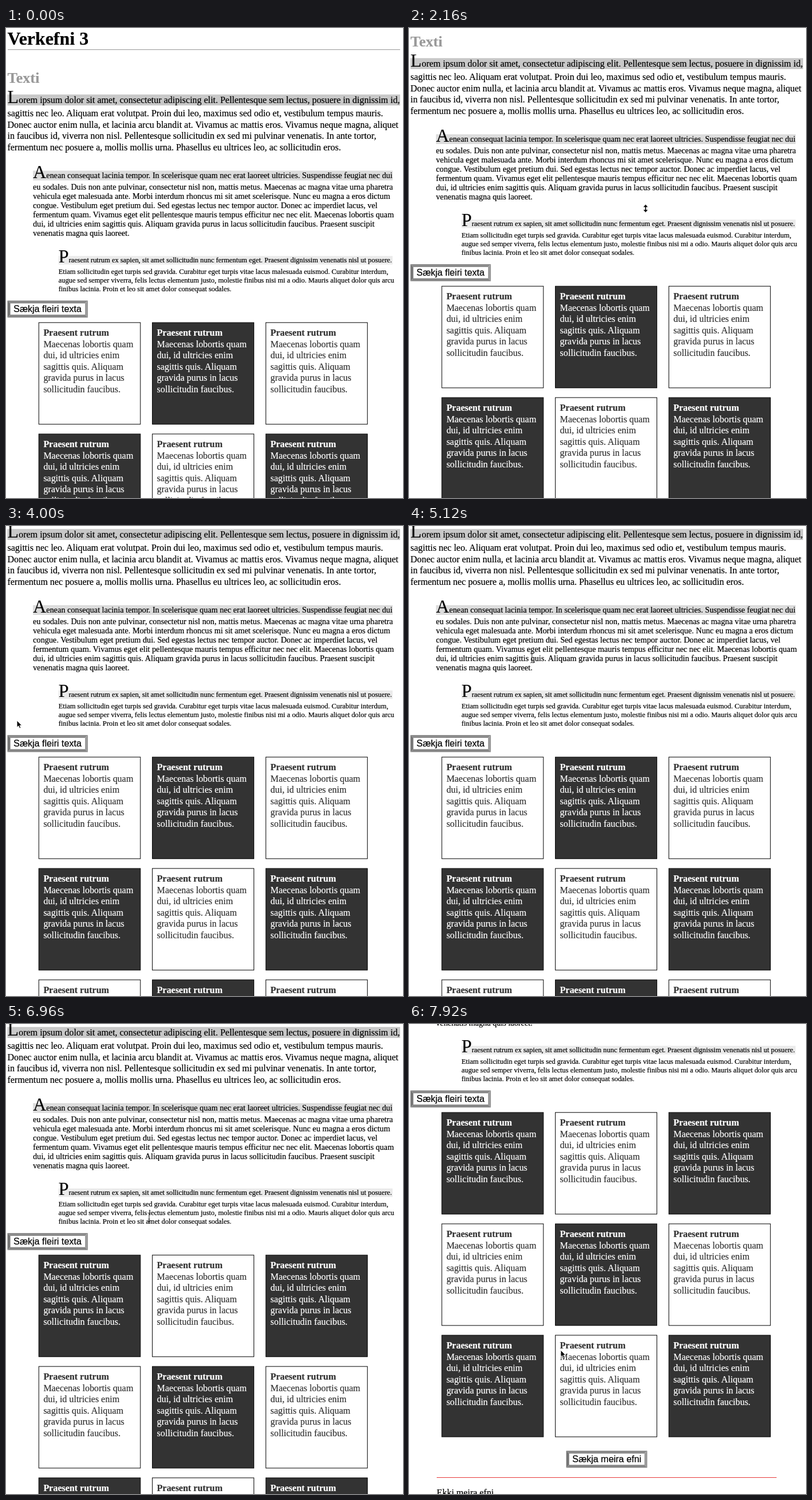
An HTML page that plays this animation: 688 by 814 pixels, repeating every 8000 ms.

```html
<!DOCTYPE html>
<html lang="is">
<head>
<meta charset="utf-8">
<title>Verkefni 3</title>
<style>
  html, body { margin: 0; width: 100%; height: 100%; overflow: hidden; background: #fff; }
  svg { display: block; width: 688px; height: 814px; color: #000; }
  text {
    font-family: "Liberation Serif", Times, serif; white-space: pre;
    fill: currentColor; stroke: currentColor; stroke-width: .2px;
  }
  .ui { font-family: "Liberation Sans", Arial, sans-serif; }
  .b { font-weight: bold; }
  .light rect { fill: var(--paper); }
  .light text { color: var(--ink); }
  .dark rect { fill: var(--ink); }
  .dark text { color: var(--paper); }
  .box rect { stroke: #000; }
</style>
</head>
<body>
<svg id="stage" viewBox="0 0 688 814">
  <g id="page"></g>
  <g id="pointer">
    <circle id="ring" r="15" fill="none" stroke="#000" stroke-width="1.6"/>
    <path id="arrow" d="M0 0V11.6L2.7 9.1 4.6 13.3 6.6 12.4 4.8 8.4H8.3Z" stroke="#fff" stroke-width=".8"/>
    <path id="beam" d="M-2.5-8Q0-8 0-6.5Q0-8 2.5-8M0-6.5V6.5M-2.5 8Q0 8 0 6.5Q0 8 2.5 8M-1.5 3H1.5" fill="none" stroke="#222"/>
    <path id="resize" d="M0-7L4.3-2.2H1.1V2.2H4.3L0 7-4.3 2.2H-1.1V-2.2H-4.3Z" stroke="#fff" stroke-width=".6"/>
  </g>
</svg>
<script>
const $ = id => document.getElementById(id);
const page = $('page');

function add(tag, attrs, parent = page, content = '') {
  const el = document.createElementNS('http://www.w3.org/2000/svg', tag);
  for (const k in attrs) el.setAttribute(k, attrs[k]);
  el.textContent = content;
  parent.appendChild(el);
  return el;
}

const write = (x, y, size, content, extra = {}, parent = page) =>
  add('text', { x, y, 'font-size': size, ...extra }, parent, content);

const rule = (x, y, w, color) => add('rect', { x, y, width: w, height: 1, fill: color });

// Paragraph with a large initial and a tinted first line
function paragraph({ x, y, size, gap, lead, right, tint, lines }) {
  const top = y - size * .93;
  add('rect', { x, y: top, width: right - x, height: size * 1.19, fill: tint });
  const first = write(x, y, 31.8, '');
  add('tspan', {}, first, lines[0][0]);
  add('tspan', { 'font-size': size }, first, lines[0].slice(1));
  lines.slice(1).forEach((s, i) => write(x, y + gap + i * lead, size, s));
}

function button(x, y, w, h, label) {
  const r = x + w, b = y + h, e = 5;
  const side = (points, fill) => add('polygon', { points, fill });
  add('rect', { x, y, width: w, height: h, fill: '#fff' });
  side([x, y, r, y, r - e, y + e, x + e, y + e], '#8c8c8c');
  side([r, y, r, b, r - e, b - e, r - e, y + e], '#9c9c9c');
  side([x, b, r, b, r - e, b - e, x + e, b - e], '#858585');
  side([x, y, x, b, x + e, b - e, x + e, y + e], '#757575');
  write(x + 10.5, y + 20.3, 15.95, label, { class: 'ui' });
}

write(2.5, 29, 31.7, 'Verkefni 3', { class: 'b' });
rule(3, 37, 680, '#999');
write(2.5, 94.5, 26, 'Texti', { class: 'b', color: '#999' });

paragraph({ x: 2.5, y: 130, size: 15.93, gap: 23, lead: 19.5, right: 683, tint: '#c8c8c8', lines: [
  'Lorem ipsum dolor sit amet, consectetur adipiscing elit. Pellentesque sem lectus, posuere in dignissim id,',
  'sagittis nec leo. Aliquam erat volutpat. Proin dui leo, maximus sed odio et, vestibulum tempus mauris.',
  'Donec auctor enim nulla, et lacinia arcu blandit at. Vivamus ac mattis eros. Vivamus neque magna, aliquet',
  'in faucibus id, viverra non nisl. Pellentesque sollicitudin ex sed mi pulvinar venenatis. In ante tortor,',
  'fermentum nec posuere a, mollis mollis urna. Phasellus eu ultrices leo, ac sollicitudin eros.'
] });
paragraph({ x: 46.8, y: 260.3, size: 14.15, gap: 20, lead: 16, right: 670, tint: '#dcdcdc', lines: [
  'Aenean consequat lacinia tempor. In scelerisque quam nec erat laoreet ultricies. Suspendisse feugiat nec dui',
  'eu sodales. Duis non ante pulvinar, consectetur nisl non, mattis metus. Maecenas ac magna vitae urna pharetra',
  'vehicula eget malesuada ante. Morbi interdum rhoncus mi sit amet scelerisque. Nunc eu magna a eros dictum',
  'congue. Vestibulum eget pretium dui. Sed egestas lectus nec tempor auctor. Donec ac imperdiet lacus, vel',
  'fermentum quam. Vivamus eget elit pellentesque mauris tempus efficitur nec nec elit. Maecenas lobortis quam',
  'dui, id ultricies enim sagittis quis. Aliquam gravida purus in lacus sollicitudin faucibus. Praesent suscipit',
  'venenatis magna quis laoreet.'
] });
paragraph({ x: 91, y: 406.3, size: 12.36, gap: 19.4, lead: 15.1, right: 670, tint: '#ebebeb', lines: [
  'Praesent rutrum ex sapien, sit amet sollicitudin nunc fermentum eget. Praesent dignissim venenatis nisl ut posuere.',
  'Etiam sollicitudin eget turpis sed gravida. Curabitur eget turpis vitae lacus malesuada euismod. Curabitur interdum,',
  'augue sed semper viverra, felis lectus elementum justo, molestie finibus nisi mi a odio. Mauris aliquet dolor quis arcu',
  'finibus lacinia. Proin et leo sit amet dolor consequat sodales.'
] });

button(2.5, 472, 139.5, 29.5, 'Sækja fleiri texta');

const boxLines = ['Praesent rutrum', 'Maecenas lobortis quam', 'dui, id ultricies enim',
  'sagittis quis. Aliquam', 'gravida purus in lacus', 'sollicitudin faucibus.'];
for (let i = 0; i < 9; i++) {
  const x = 56.4 + (i % 3) * 196.7, y = 509.7 + Math.floor(i / 3) * 192.9;
  const box = add('g', { class: 'box ' + (i % 2 ? 'dark' : 'light') });
  add('rect', { x: x + .5, y: y + .5, width: 176, height: 176 }, box);
  boxLines.forEach((s, n) =>
    write(x + 8.5, y + 23.6 + n * 19.5, 15.93, s, n ? {} : { class: 'b' }, box));
}

button(272.5, 1096, 140.5, 29.5, 'Sækja meira efni');
rule(48, 1142, 589, '#e63a3a');
write(48, 1174, 15.93, 'Ekki meira efni');

// [time, scroll]
const scrollKeys = [[0, 0], [1920, 0], [2000, 14], [2160, 63], [2320, 96], [2480, 110], [7200, 110],
  [7280, 180], [7360, 300], [7440, 384], [7680, 384], [7920, 357]];
// [time, x, y]
const moveKeys = [[0, 672, 277], [560, 672, 277], [720, 558, 290], [880, 558, 290],
  [960, 480, 281], [1040, 410, 312.5], [2560, 410, 312.5], [2640, 370, 290], [2720, 270, 278],
  [2880, 91, 297], [3040, 91, 297], [3120, 70, 330], [3280, 19, 337], [4800, 19, 337],
  [5120, 213, 229], [5360, 213, 229], [5680, 248, 335], [7200, 248, 335], [7440, 238, 524], [7920, 263, 565]];
// [time, pointer shape]
const shapes = [[0, 'none'], [560, 'beam'], [1040, 'arrow'], [1440, 'resize'], [2640, 'arrow'],
  [4880, 'beam'], [7280, 'arrow']];
const clicks = [1280, 3280, 3680, 4240, 4640];
const toggles = [3280, 3680, 4240, 4640, 5440, 6080, 6640];

function track(keys, t) {
  const i = keys.findIndex(k => k[0] > t);
  if (i < 0) return keys[keys.length - 1].slice(1);
  const a = keys[i - 1], b = keys[i], p = (t - a[0]) / (b[0] - a[0]);
  return a.slice(1).map((v, n) => v + (b[n + 1] - v) * p);
}

// Share of inversion: each toggle eases to the opposite state
function inverted(t) {
  return toggles.reduce((m, at, i) => {
    const p = Math.min(1, Math.max(0, (t - at + 40) / 290));
    const eased = 1 - (1 - p) ** 2 * (1 + 2 * p);
    return m + (i % 2 ? -eased : eased);
  }, 0);
}

const grey = v => `rgb(${v},${v},${v})`;

function draw() {
  const t = Math.floor(performance.now() % 8000 / 80) * 80;
  const [scroll] = track(scrollKeys, t), [x, y] = track(moveKeys, t);
  page.setAttribute('transform', `translate(0 ${-Math.round(scroll)})`);
  $('pointer').setAttribute('transform', `translate(${x} ${y})`);

  const shape = shapes.filter(s => s[0] <= t).pop()[1];
  for (const id of ['arrow', 'beam', 'resize']) $(id).style.display = id === shape ? '' : 'none';
  $('ring').style.display = clicks.some(c => t >= c && t < c + 160) ? '' : 'none';

  const m = inverted(t);
  page.style.setProperty('--paper', grey(Math.round(255 - 204 * m)));
  page.style.setProperty('--ink', grey(Math.round(51 + 204 * m)));
  requestAnimationFrame(draw);
}
draw();
</script>
</body>
</html>
```
